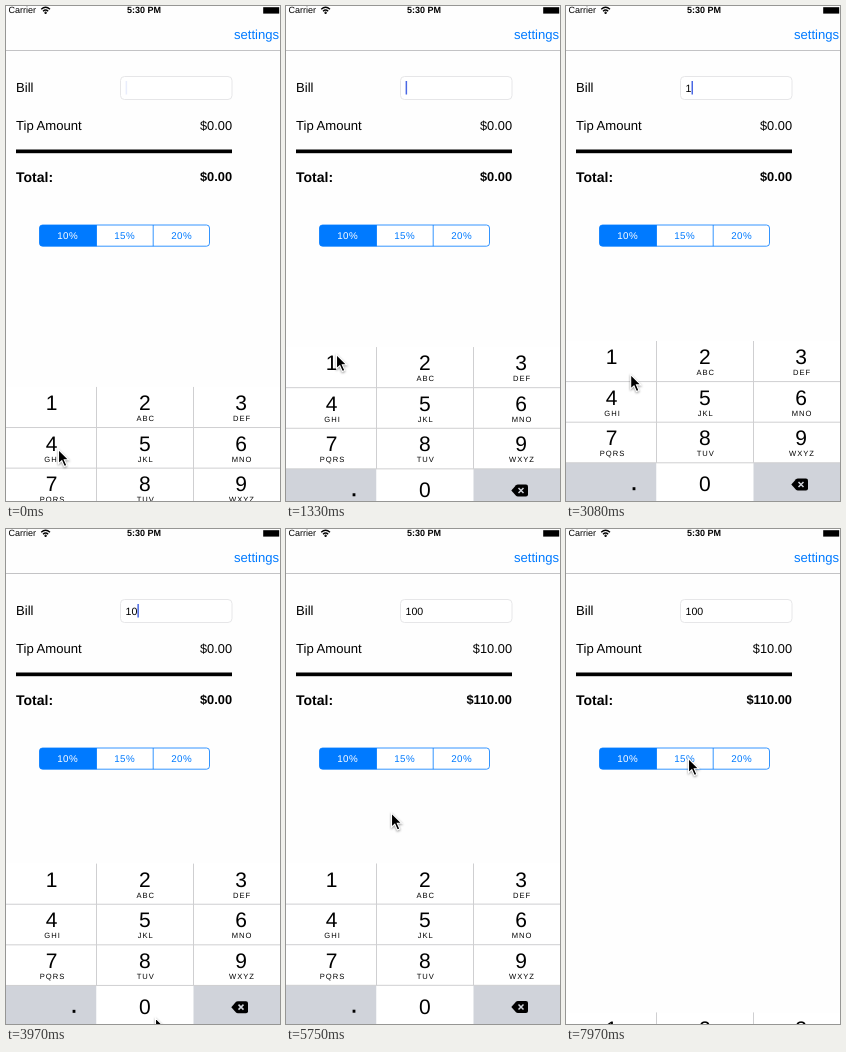
Animation of 274x495 px, one loop 8000 ms. Source, as an HTML page:

```html
<!DOCTYPE html>
<html lang="en">
<head>
<meta charset="utf-8">
<title>Tip calculator</title>
<style>
  html, body { margin: 0; width: 100%; height: 100%; overflow: hidden; background: #fff; }
  svg { display: block; width: 274px; height: 495px; font: 12.8px "Liberation Sans", Arial, sans-serif; text-rendering: geometricPrecision; }
  .bold { font-weight: bold; }
  .end { text-anchor: end; }
  .blue { fill: #007aff; }
  .status { font-size: 9px; }
  .segments, .digit, .letters { text-anchor: middle; }
  .segments { font-size: 9.8px; letter-spacing: .4px; }
  .digit { font-size: 21px; }
  .letters { font-size: 7.6px; letter-spacing: 1px; }
</style>
</head>
<body>
<svg viewBox="0 0 274 495">
  <rect width="274" height="495" fill="#fefefe"/>
  <path d="M0 44.5H274" stroke="#c3c3c5"/>

  <text class="status" x="2.5" y="7.3">Carrier</text>
  <g fill="none" stroke="#000" stroke-width="1.4">
    <path d="M35.2 3.2Q39.6-.6 44 3.2M37 5.2Q39.6 3 42.2 5.2"/>
    <circle cx="39.6" cy="6.8" r=".5"/>
  </g>
  <text class="status bold" x="121" y="7.3">5:30 PM</text>
  <rect x="257.2" y="1.2" width="16" height="6.4"/>
  <text class="blue" x="228" y="32.6" font-size="13.1">settings</text>

  <text x="10" y="86.3" font-size="13.1">Bill</text>
  <rect x="114.5" y="70.5" width="111.5" height="23" rx="4" fill="#fff" stroke="#e6e6e8"/>
  <text id="bill" x="119.5" y="85.8" font-size="10.6"></text>
  <rect id="caret" y="75" width="1.5" height="13.5" fill="#4a68e4"/>
  <text x="10" y="123.7" font-size="13.1">Tip Amount</text>
  <text id="tip" class="end" x="226" y="123.7"></text>
  <rect x="10" y="143.5" width="216" height="3.7"/>
  <text class="bold" x="10" y="176" font-size="14">Total:</text>
  <text id="total" class="bold end" x="226" y="175.3"></text>

  <rect x="33.5" y="219" width="170" height="21.2" rx="3" fill="#fff" stroke="#007aff" stroke-width=".8"/>
  <path class="blue" d="M90.5 219H36.5a3 3 0 0 0-3 3v15.2a3 3 0 0 0 3 3h54z"/>
  <path d="M90.5 219v21.2M147.2 219v21.2" stroke="#007aff" stroke-width=".8"/>
  <g class="segments">
    <text x="61.6" y="233" fill="#fff">10%</text>
    <text class="blue" x="118.6" y="233">15%</text>
    <text class="blue" x="175.6" y="233">20%</text>
  </g>

  <g id="pad"></g>
  <path id="mouse" d="M0 0V14.2L3.3 11.2 5.8 17 8.3 15.9 5.8 10.3H10.3Z" stroke="#fff" stroke-width="1.1"
    style="filter: drop-shadow(.5px 1.5px 1px #0006)"/>
</svg>
<script>
const LOOP = 8000, ROW = 40.6, OPEN = 334.5, CLOSED = 496.5;
const TAP = 5740, HIDE = 5780;
const edges = [0, 90.5, 187.5, 274], centers = [45.5, 138.8, 235];
const letters = ['', 'ABC', 'DEF', 'GHI', 'JKL', 'MNO', 'PQRS', 'TUV', 'WXYZ'];
const $ = id => document.getElementById(id);

// [key, pressed at, released at]
const presses = [['1', 2640, 2900], ['0', 3670, 3900], ['0', 4260, 4500]];
// mouse moves: [start, end, x, y]
const moves = [
  [0, 0, 52.5, 443.5], [250, 1000, 50.5, 348.5], [2950, 3500, 149.5, 489],
  [4800, 5600, 105.5, 284], [5850, 6250, 122.5, 229.5]
];

function key(label, col, row, sub = '', fill = '#fff') {
  const x = edges[col], y = row * ROW, c = centers[col];
  return `<rect id="key${label}" x="${x}" y="${y}" width="${edges[col + 1] - x}" height="${ROW}" fill="${fill}"/>` +
    `<text class="digit" x="${c}" y="${y + (row < 3 ? 23.2 : 28.2)}">${label}</text>` +
    `<text class="letters" x="${c + 1}" y="${y + 34.2}">${sub}</text>`;
}

function buildPad() {
  let html = letters.map((sub, i) => key(i + 1, i % 3, Math.floor(i / 3), sub)).join('');
  html += key('', 0, 3, '', '#d0d3da') + key('0', 1, 3) + key('', 2, 3, '', '#d0d3da');
  html += '<rect x="66.6" y="146.2" width="2.8" height="3"/>';
  html += `<path d="M0 ${ROW}H274M0 ${2 * ROW}H274M0 ${3 * ROW}H274M90.5 0V${3 * ROW}M187.5 0V${3 * ROW}"
    stroke="#cfcfd1" fill="none"/>`;
  html += `<path d="M225.3 143.5L230 138.2Q230.7 137.5 231.8 137.5H240Q242 137.5 242 139.5V147.5
    Q242 149.5 240 149.5H231.8Q230.7 149.5 230 148.8Z"/>
    <path d="M232.5 141l5 5m0-5l-5 5" stroke="#d0d3da" stroke-width="1.5"/>`;
  $('pad').innerHTML = html;
}

// Overdamped slide: fraction of the distance still left after u seconds
const left = u => 2.25 * Math.exp(-1.5 * u) - 1.25 * Math.exp(-2.7 * u);

function padTop(t) {
  if (t < HIDE) return OPEN + 46.5 * Math.exp(-1.47 * t / 1000);
  return CLOSED - (CLOSED - OPEN) * left((t - HIDE) / 1000);
}

function mouseAt(t) {
  let [, , x, y] = moves[0];
  for (const [start, end, nx, ny] of moves.slice(1)) {
    const p = Math.min(1, Math.max(0, (t - start) / (end - start)));
    const e = p * p * (3 - 2 * p);
    x += (nx - x) * e;
    y += (ny - y) * e;
  }
  return `translate(${x} ${y})`;
}

function draw(t) {
  const bill = presses.filter(p => t >= p[1]).map(p => p[0]).join('');
  const amount = t >= TAP ? 100 : 0;
  $('bill').textContent = bill;
  $('tip').textContent = '$' + (amount * .1).toFixed(2);
  $('total').textContent = '$' + (amount * 1.1).toFixed(2);
  $('caret').setAttribute('x', 119.6 + bill.length * 5.9);
  $('caret').setAttribute('opacity', t < TAP ? Math.min(1, .12 + t / 400) : 0);
  for (const label of ['0', '1']) {
    const down = presses.some(([k, a, b]) => k === label && t >= a && t < b);
    $('key' + label).setAttribute('fill', down ? '#d0d3da' : '#fff');
  }
  $('pad').setAttribute('transform', `translate(0 ${padTop(t)})`);
  $('mouse').setAttribute('transform', mouseAt(t));
}

buildPad();
const begin = performance.now();
function tick() {
  draw((performance.now() - begin) % LOOP);
  requestAnimationFrame(tick);
}
tick();
</script>
</body>
</html>
```
